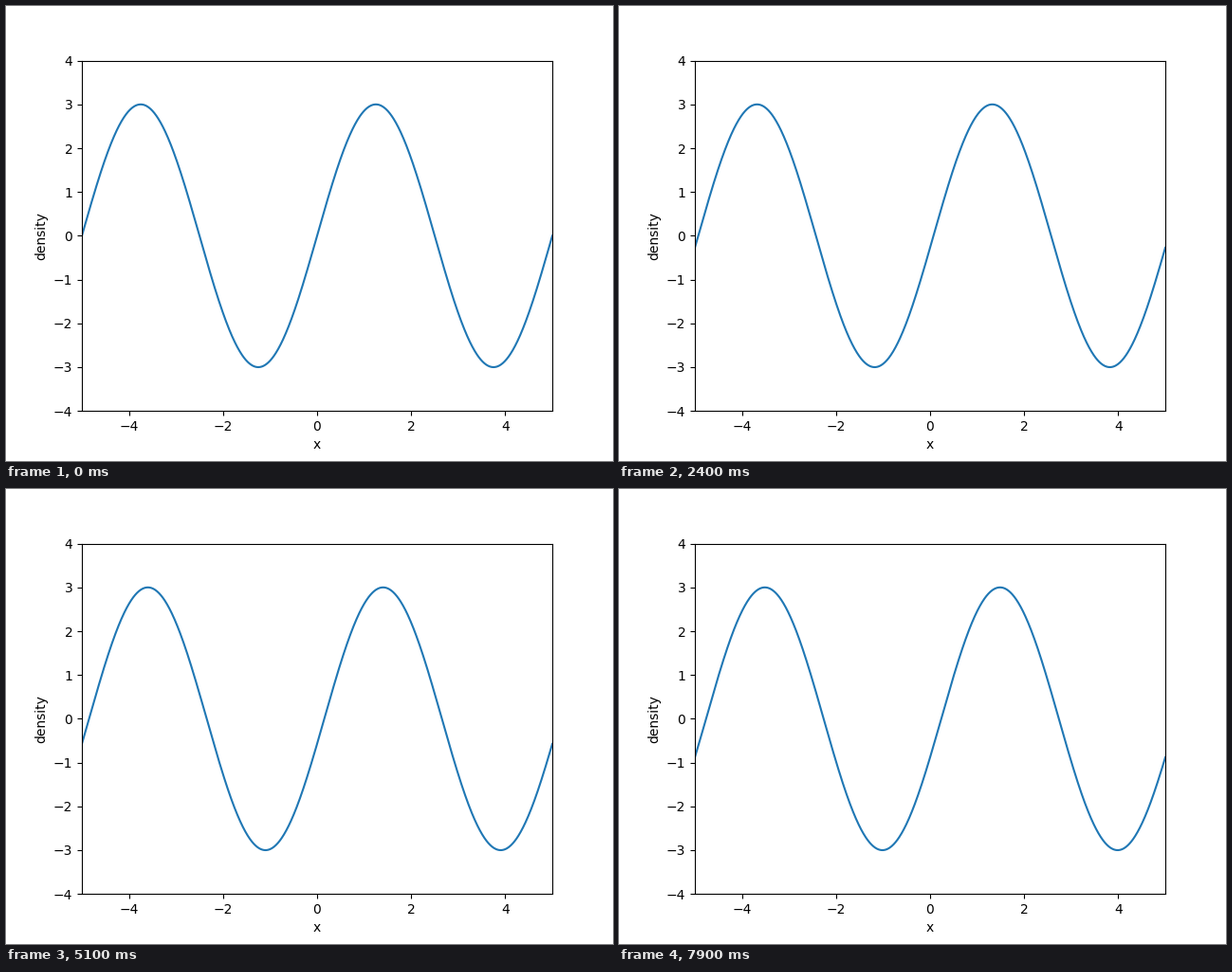
A matplotlib script for the animation above (8 s loop, 640 by 480 pixels).

```python
import matplotlib.pyplot as plt
import numpy as np
from matplotlib.animation import FuncAnimation

FRAMES = 80
INTERVAL = 100      # ms
AMPLITUDE = 3
WAVELENGTH = 5
STEP = 0.003        # distance travelled per frame

x = np.linspace(-5, 5, 1000)


def wave(i):
    return AMPLITUDE * np.sin(2 * np.pi * (x - STEP * i) / WAVELENGTH)


fig, ax = plt.subplots(figsize=(6.4, 4.8), dpi=100)
ax.set(xlim=(-5, 5), ylim=(-4, 4), xlabel="x", ylabel="density")
line, = ax.plot(x, wave(0), color="C0", lw=1.5)


def update(i):
    line.set_ydata(wave(i))
    return line,


anim = FuncAnimation(fig, update, frames=FRAMES, interval=INTERVAL,
                     repeat=True, repeat_delay=0)
plt.show()
```
